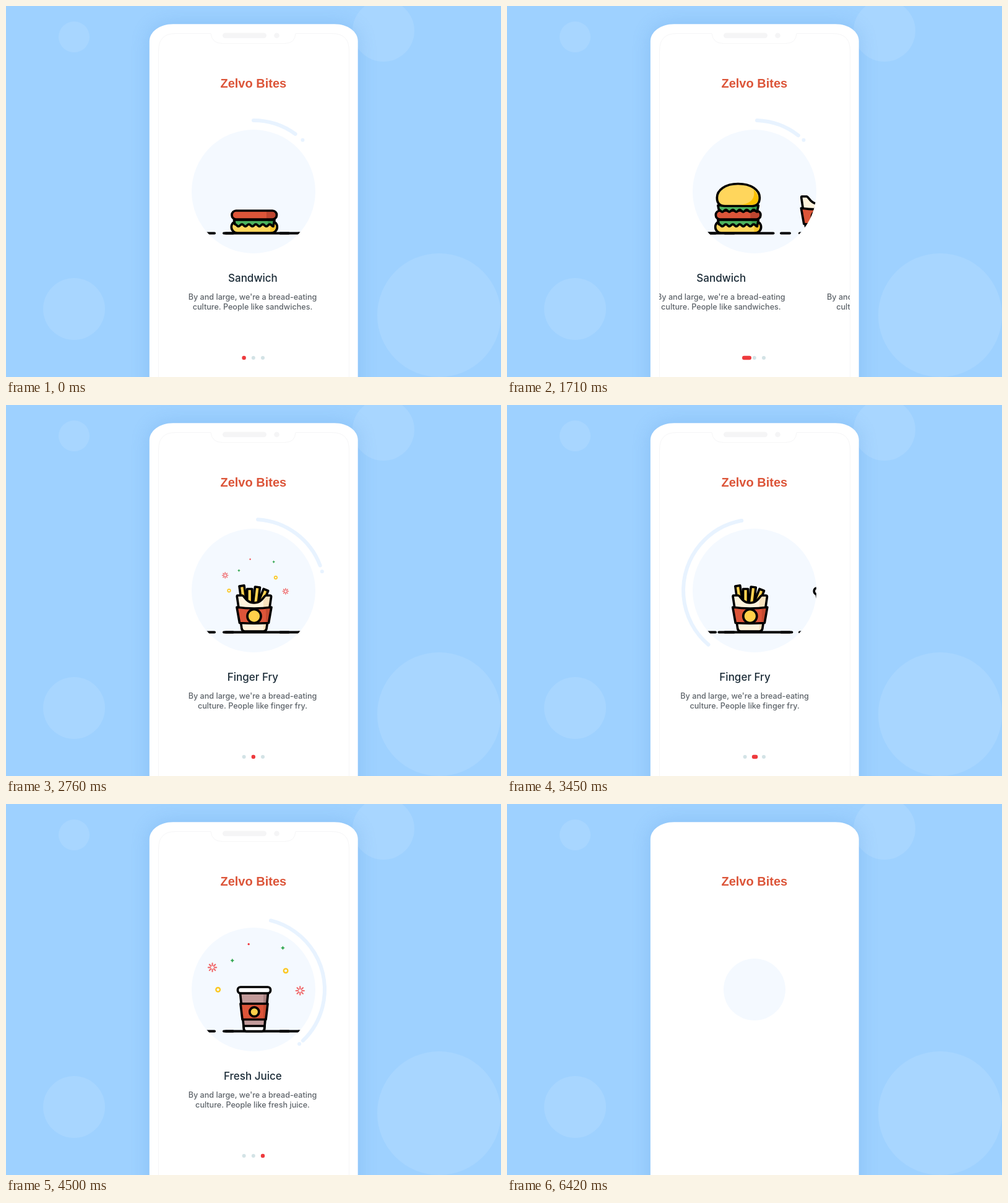
An HTML page with a canvas for the animation above (6.57 s loop, 800 by 600 pixels).

```html
<!DOCTYPE html>
<html lang="en">
<head>
<meta charset="utf-8">
<title>Food onboarding</title>
<style>
html, body { margin: 0; width: 800px; height: 600px; overflow: hidden; background: #9ed1ff; }
canvas { display: block; }
</style>
</head>
<body>
<canvas id="stage" width="800" height="600"></canvas>
<script>
const ctx = document.getElementById('stage').getContext('2d');
const LOOP = 6570, CX = 400, CY = 300;
const YELLOW = '#ffd65c', RED = '#dc5539', GREEN = '#4db35f', CREAM = '#fff3dc', RING = '#e8f3ff';

const clamp = v => Math.max(0, Math.min(1, v));
const span = (t, start, length) => clamp((t - start) / length);
const sine = u => (1 - Math.cos(Math.PI * u)) / 2;
const quad = u => u < .5 ? 2 * u * u : 1 - 2 * (1 - u) ** 2;
const easeOut = u => 1 - (1 - u) ** 3;
const lerp = (a, b, u) => a + (b - a) * u;

function disc(x, y, r, fill) {
  ctx.beginPath();
  ctx.arc(x, y, r, 0, 7);
  ctx.fillStyle = fill;
  ctx.fill();
}

function line(x1, x2, y) {
  ctx.beginPath();
  ctx.moveTo(x1, y);
  ctx.lineTo(x2, y);
  ctx.stroke();
}

function box(x, y, w, h, r) {
  const p = new Path2D();
  p.roundRect(x, y, w, h, r);
  return p;
}

// Filled shape with an optional shaded right side and a black outline.
function shape(path, fill, shade, shadeX) {
  const p = typeof path === 'string' ? new Path2D(path) : path;
  ctx.fillStyle = fill;
  ctx.fill(p);
  if (shade) {
    ctx.save();
    ctx.clip(p);
    ctx.fillStyle = shade;
    ctx.fillRect(shadeX, 0, 100, 400);
    ctx.restore();
  }
  ctx.lineWidth = 3.7;
  ctx.strokeStyle = '#000';
  ctx.stroke(p);
}

function text(str, x, y, font, color) {
  ctx.font = font;
  ctx.fillStyle = color;
  ctx.fillText(str, x, y);
}

function background() {
  ctx.fillStyle = '#9ed1ff';
  ctx.fillRect(0, 0, 800, 600);
  for (const [x, y, r] of [[110, 50, 25], [610, 40, 50], [110, 490, 50], [700, 500, 100]]) {
    disc(x, y, r, '#a8d6ff');
  }
}

function phone(detail) {
  ctx.save();
  ctx.shadowColor = 'rgba(60,130,210,.22)';
  ctx.shadowBlur = 30;
  ctx.fillStyle = '#fff';
  ctx.beginPath();
  ctx.moveTo(231.8, 660);
  ctx.lineTo(231.8, 57);
  ctx.bezierCurveTo(231.8, 42, 248, 29.3, 270, 29.3);
  ctx.lineTo(531, 29.3);
  ctx.bezierCurveTo(553, 29.3, 568.7, 42, 568.7, 57);
  ctx.lineTo(568.7, 660);
  ctx.fill();
  ctx.restore();

  ctx.save();
  ctx.globalAlpha = detail;
  ctx.strokeStyle = '#f6f6f7';
  ctx.lineWidth = 1;
  ctx.stroke(new Path2D('M246.5 610V72Q246.5 44.5 274 44.5H331Q333 60.5 349 60.5H451' +
    'Q467 60.5 468 44.5H527Q554.5 44.5 554.5 72V610'));
  ctx.fillStyle = '#f5f5f6';
  ctx.fill(box(350, 43.5, 71, 8.5, 4.2));
  disc(437.5, 47.7, 4.3, '#f5f5f6');
  ctx.restore();
}

const sweeps = [
  { show: -100, grow: 1, start: 403, time: 1060 },
  { show: 1500, grow: 180, start: 2527, time: 1060 },
  { show: 3620, grow: 180, start: 4150, time: 900 },
  { show: 5055, grow: 43, start: 5098, time: 1060 }
];

function ring(t) {
  const s = sweeps.findLast(s => t >= s.show);
  const u = span(t, s.start, s.time);
  if (u >= 1) return;
  const g = easeOut(span(t, s.show, s.grow));
  const shift = s.show < 0 ? 0 : 2;
  const head = lerp((36 + shift) * g, 360, quad(u));
  const tail = lerp(shift * g, 360, u ** 3.6);
  const tip = lerp(43.7 * g, 360, quad(u));
  const rad = a => (a - 90) * Math.PI / 180;
  ctx.strokeStyle = RING;
  ctx.lineWidth = 6;
  ctx.beginPath();
  ctx.arc(CX, CY, 115, rad(tail), rad(Math.max(head, tail)));
  ctx.stroke();
  disc(CX + 115 * Math.cos(rad(tip)), CY + 115 * Math.sin(rad(tip)), 3, RING);
}

function flower(x, y) {
  ctx.strokeStyle = '#f0696b';
  ctx.lineWidth = 2.2;
  for (let i = 0; i < 8; i++) {
    const c = Math.cos(i * Math.PI / 4), s = Math.sin(i * Math.PI / 4);
    ctx.beginPath();
    ctx.moveTo(x + 3.2 * c, y + 3.2 * s);
    ctx.lineTo(x + 6.8 * c, y + 6.8 * s);
    ctx.stroke();
  }
}

function spark(x, y) {
  ctx.fillStyle = '#35a853';
  ctx.fill(new Path2D(`M${x} ${y - 3.4}l1.2 2.2 2.2 1.2-2.2 1.2-1.2 2.2-1.2-2.2-2.2-1.2 2.2-1.2z`));
}

function hoop(x, y) {
  ctx.strokeStyle = '#fcc721';
  ctx.lineWidth = 2.4;
  ctx.beginPath();
  ctx.arc(x, y, 3.4, 0, 7);
  ctx.stroke();
}

const bursts = [[460, 1250], [2652, 3080], [4250, 4750]];

function particles(t) {
  for (const [start, end] of bursts) {
    if (t <= start || t >= end + 200) continue;
    const k = easeOut(span(t, start, 350));
    ctx.save();
    ctx.globalAlpha = 1 - span(t, end, 200);
    ctx.translate(CX, CY);
    ctx.scale(k, k);
    flower(-68, -36.5);
    flower(77, 2);
    hoop(-58.7, .3);
    hoop(53.3, -31);
    spark(-35, -48);
    spark(48.5, -68.8);
    disc(-8, -75, 1.7, '#f0343a');
    ctx.restore();
  }
}

function lettuce(y) {
  const p = new Path2D();
  p.moveTo(368.5, y);
  p.lineTo(434, y);
  p.lineTo(432.5, y + 7);
  for (let x = 432; x >= 370; x--) {
    p.lineTo(x, y + 8.7 - 1.7 * Math.cos((x - 370) / 62 * Math.PI * 11));
  }
  p.closePath();
  shape(p, GREEN, '#3b9c4c', 423);
}

function falling(u, draw) {
  if (!u) return;
  ctx.save();
  ctx.translate(0, -150 * (1 - easeOut(u)));
  draw();
  ctx.restore();
}

function sandwich(t) {
  shape(box(364.3, 347.8, 74, 19.3, 9.6), YELLOW, '#fcc62d', 427);
  lettuce(346);
  shape(box(365, 331, 72.5, 14, 6.8), RED, '#bd4630', 421);
  falling(span(t, 60, 180), () => lettuce(322.5));
  falling(span(t, 170, 250), () => {
    const bun = new Path2D('M401 287.5C423 287.5 436 298 436 310C436 319 431 323.5 423 323.5H380' +
      'C371 323.5 367 319 367 310C367 298 380 287.5 401 287.5Z');
    shape(bun, YELLOW);
    ctx.fillStyle = '#fcc000';
    ctx.fill(new Path2D('M426 297C434 304 436 314 431 319Q428 321.5 423 321.5H405C421 320 430 311 426 297Z'));
  });
}

function fries(t) {
  const drop = 30 * (1 - easeOut(span(t, 2150, 380)));
  for (const [x, y, tilt] of [[381, 292.5, -.14], [393.8, 297.5, 0], [406.5, 294.5, .12], [420, 299, .38]]) {
    ctx.save();
    ctx.translate(x, y + drop);
    ctx.rotate(tilt);
    shape(box(-4, 0, 8, 29, 0), YELLOW, '#f5bd2a', 1);
    ctx.restore();
  }
  shape('M374 308H382C386 309 388 320 401 320C414 320 416 309 420 308H427Q429 308 428.5 311' +
    'L421 362Q420 366 416 366H386Q382 366 381 362L373.5 311Q373 308 374 308Z', CREAM, '#f8e2bd', 416);
  shape('M373 327Q401 331 429 327L424.5 352.5Q401 354 377.5 352.5Z', RED, '#c54b31', 420);
  shape(box(390, 330.5, 22, 22, 11), '#ffd04a');
}

function juice() {
  shape('M378.5 306H423.5L417.5 364Q417.5 367.5 413.5 367.5H388.5Q384.5 367.5 384.5 364Z', '#c39b9a', '#a98281', 416);
  shape('M384 359H418L417.5 364Q417.5 367.5 413.5 367.5H388.5Q384.5 367.5 384.5 364Z', '#fff');
  shape('M379 323H423L420 348.5H382Z', RED, '#c54b31', 416);
  shape(box(393.8, 328.7, 15, 15, 7.5), '#ffd04a');
  shape(box(374.5, 296, 53, 10, 4.5), '#fff');
}

const icons = [sandwich, fries, juice];
const slides = [
  ['Sandwich', 'sandwiches'],
  ['Finger Fry', 'finger fry'],
  ['Fresh Juice', 'fresh juice']
];
const textStops = [0, 275, 557];

const pageAt = t => sine(span(t, 1538, 600)) + sine(span(t, 3364, 600));

function along(stops, v) {
  const i = Math.min(1, Math.floor(v));
  return lerp(stops[i], stops[i + 1], v - i);
}

function scene(t, alpha) {
  const page = pageAt(t + 10);
  ctx.save();
  ctx.globalAlpha = alpha;
  ctx.beginPath();
  ctx.arc(CX, CY, 100, 0, 7);
  ctx.clip();
  ctx.strokeStyle = '#000';
  ctx.lineWidth = 4;
  for (const [a, b] of [[310, 337], [352, 367], [443, 457], [473, 500]]) line(a, b, 367.5);
  icons.forEach((draw, i) => {
    const d = i - page;
    if (Math.abs(d) >= 1) return;
    ctx.lineWidth = 4;
    line(355 + 200 * d, 473 + 200 * d, 367.5);
    ctx.save();
    ctx.translate(130 * d, 0);
    draw(t);
    ctx.restore();
  });
  ctx.restore();
}

function captions(t, alpha) {
  const shift = along(textStops, pageAt(t));
  ctx.save();
  ctx.globalAlpha = alpha;
  ctx.beginPath();
  ctx.rect(246, 420, 308, 90);
  ctx.clip();
  slides.forEach(([name, food], i) => {
    const x = 398.5 + textStops[i] - shift;
    const body = '500 12.6px Inter, sans-serif';
    text(name, x + .4, 446, '500 17px Inter, sans-serif', '#1c2c38');
    text("By and large, we're a bread-eating", x, 475.4, body, '#5d6369');
    text(`culture. People like ${food}.`, x, 491.4, body, '#5d6369');
  });
  ctx.restore();
}

function pager(t, alpha) {
  const page = pageAt(t);
  ctx.save();
  ctx.globalAlpha = alpha;
  for (let i = 0; i < 3; i++) disc(384.6 + 15.2 * i, 569, 3, '#d3e3e6');
  const w = 6.4 + 13.5 * Math.abs(Math.sin(Math.PI * page)) ** .8;
  ctx.fillStyle = '#ee3a3d';
  ctx.fill(box(384.6 + 15.2 * page - w / 2, 565.8, w, 6.4, 3.2));
  ctx.restore();
}

function draw(t) {
  const alpha = 1 - span(t, 4800, 250);
  const titleY = 132 + 173 * (sine(span(t, 4850, 340)) - sine(span(t, 5980, 430)));
  ctx.lineCap = ctx.lineJoin = 'round';
  ctx.textAlign = 'center';
  background();
  phone(1 - span(t, 5700, 200));
  ring(t);
  disc(CX, CY, 100 - 50 * quad(span(t, 5600, 820)), '#f4f9ff');
  particles(t);
  if (alpha > 0) {
    scene(t, alpha);
    captions(t, alpha);
    pager(t, alpha);
  }
  text('Zelvo Bites', 399.8, titleY, 'bold 20px "Liberation Sans", Arial, sans-serif', RED);
}

const begin = performance.now();
function frame() {
  draw((performance.now() - begin) % LOOP);
  requestAnimationFrame(frame);
}
frame();
</script>
</body>
</html>
```
